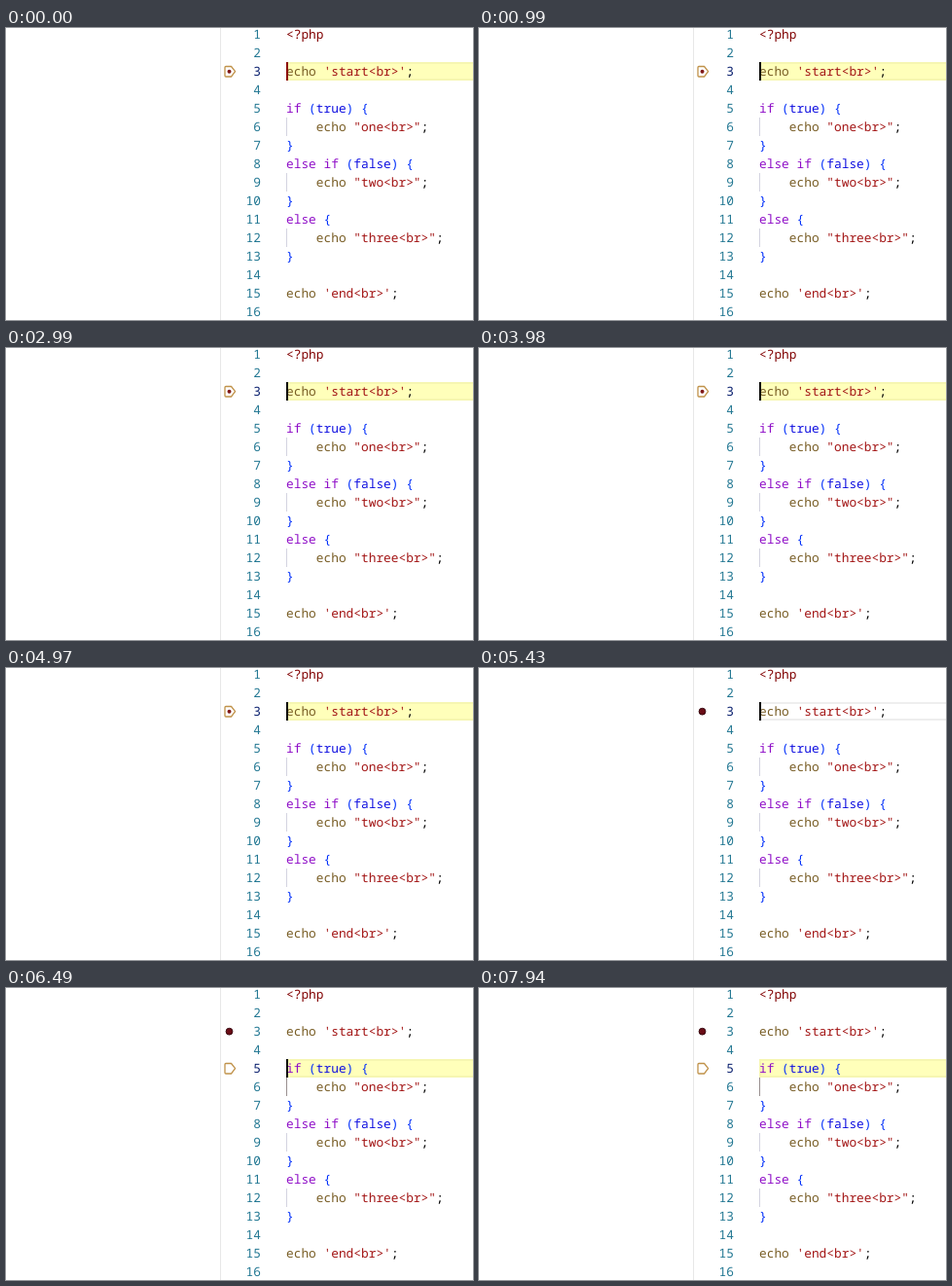
An HTML page for the animation above (8000 ms loop, 480 by 300 pixels).

```html
<!DOCTYPE html>
<html lang="en">
<head>
<meta charset="utf-8">
<title>Stepping through PHP</title>
<style>
  html, body { margin: 0; width: 100%; height: 100%; overflow: hidden; background: #fff; }
  svg { display: block; width: 480px; height: 300px; }
  text {
    font: 12.83px "Noto Sans Mono", "DejaVu Sans Mono", monospace;
    white-space: pre;
    text-rendering: geometricPrecision;
  }
</style>
</head>
<body>
<svg id="stage" viewBox="0 0 480 300"></svg>
<script>
const LOOP = 8000, ROW = 19, LEFT = 288;
const STEP_OUT = 5430, STEP_IN = 5500;
const BLINKS = [530, 990, 1520, 2000, 2530, 2990, 3520, 3980, 4510, 4970,
                5960, 6490, 6950, 7480, 7940];

const CODE = `<?php

echo 'start<br>';

if (true) {
    echo "one<br>";
}
else if (false) {
    echo "two<br>";
}
else {
    echo "three<br>";
}

echo 'end<br>';
`.split('\n');

const RULES = [
  [/^<\?php/, '#800000'],
  [/^(['"]).*?\1/, '#a31515'],
  [/^echo/, '#795e26'],
  [/^(if|else)/, '#9010c8'],
  [/^(true|false)/, '#1010e0'],
  [/^[(){}]/, '#0431fa'],
  [/^(\s+|.)/, '#000']
];

const stage = document.getElementById('stage');
const rowTop = n => ROW * n - 22;

function add(tag, attrs, parent = stage) {
  const el = document.createElementNS('http://www.w3.org/2000/svg', tag);
  for (const key in attrs) el.setAttribute(key, attrs[key]);
  return parent.appendChild(el);
}

const box = (x, y, width, height, fill, parent) =>
  add('rect', { x, y, width, height, fill }, parent);

const show = (el, on) => el.setAttribute('visibility', on ? 'visible' : 'hidden');
const moveTo = (el, row) => el.setAttribute('transform', `translate(0 ${rowTop(row)})`);

function writeLine(line, y) {
  const text = add('text', { x: LEFT, y });
  while (line) {
    for (const [pattern, fill] of RULES) {
      const hit = line.match(pattern);
      if (!hit) continue;
      add('tspan', { fill }, text).textContent = hit[0];
      line = line.slice(hit[0].length);
      break;
    }
  }
}

box(220, 0, 1, 300, '#e7e7e7');

const current = add('g', {});
add('rect', { x: LEFT + 1, y: 1, width: 220, height: 17, fill: 'none',
              stroke: '#eee', 'stroke-width': 2 }, current);
const glow = box(LEFT, 0, 192, ROW, 'rgba(255,255,102,.45)', current);

const guides = [6, 9, 12].map(n => box(LEFT, rowTop(n), 1, ROW, '#d3d3e0'));

const numbers = CODE.map((line, i) => {
  const y = rowTop(i + 1) + 14;
  const label = add('text', { x: 262, y, 'text-anchor': 'end' });
  label.textContent = i + 1;
  writeLine(line, y);
  return label;
});

const breakpoint = add('circle', { cx: 229.5, cy: 44.7, r: 3.4, fill: '#6a0c16',
                                   stroke: '#380a12', 'stroke-width': 1 });
const pointer = add('g', {});
add('path', { d: 'M226 4.5H231.5L235.6 9.7L231.5 15H226Q225 15 225 14V5.5Q225 4.5 226 4.5Z',
              fill: 'none', stroke: '#c0924a', 'stroke-width': 1.3,
              'stroke-linejoin': 'round' }, pointer);
const dot = add('circle', { cx: 229.5, cy: 9.7, r: 2, fill: '#801818' }, pointer);
const caret = box(LEFT, 0, 2, ROW, '#000');

function draw(t) {
  const stepped = t >= STEP_IN;
  const paused = t < STEP_OUT || stepped;
  const row = stepped ? 5 : 3;

  [current, pointer, caret].forEach(el => moveTo(el, row));
  show(glow, paused);
  show(pointer, paused);
  show(dot, t < STEP_OUT);
  show(breakpoint, t >= STEP_OUT);
  numbers.forEach((el, i) => el.setAttribute('fill', i + 1 === row ? '#0b216f' : '#237893'));
  guides[0].setAttribute('fill', stepped ? '#998f8f' : '#d3d3e0');

  const flips = BLINKS.filter(b => b <= t).length;
  show(caret, flips % 2 === 0);
  caret.setAttribute('fill', flips ? '#000' : '#8b0000');
}

const start = performance.now();
function tick() {
  draw((performance.now() - start) % LOOP);
  requestAnimationFrame(tick);
}
tick();
</script>
</body>
</html>
```
